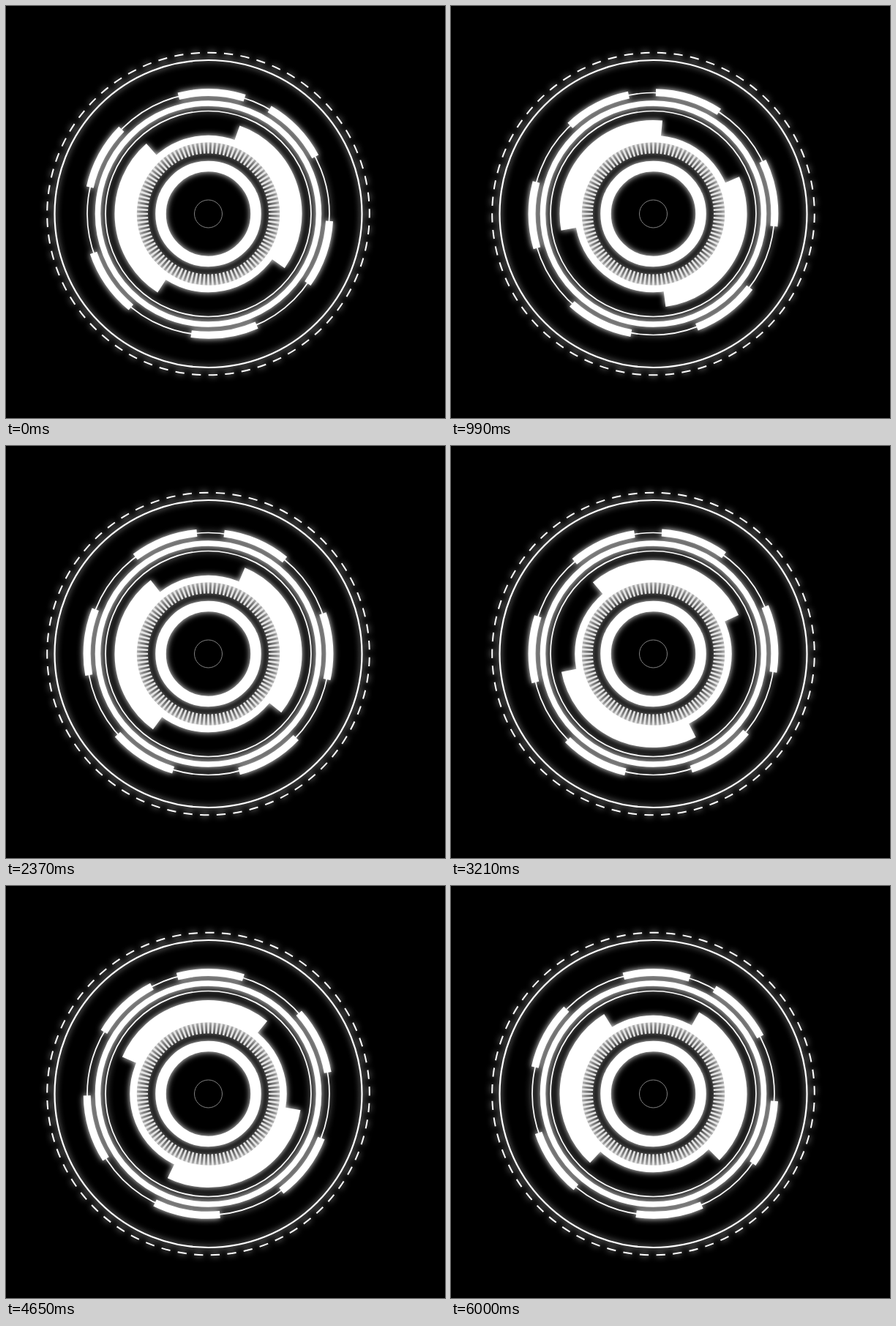
An HTML page for the animation above (6030 ms loop, 600 by 563 pixels).

```html
<!DOCTYPE html>
<html lang="en">
<head>
<meta charset="utf-8">
<title>Rotating dial</title>
<style>
  html, body { margin: 0; height: 100%; overflow: hidden; background: #000; }
  svg { display: block; width: 600px; height: 563px; }
  circle, path { fill: none; stroke: #fff; }
  .glow { filter: drop-shadow(0 0 4px rgba(255, 255, 255, .95)); }
</style>
</head>
<body>
<svg viewBox="0 0 600 563">
  <g transform="translate(276.5 284)">
    <g class="glow">
      <circle r="65" stroke-width="14.5"/>
      <path id="ticks" stroke-width="16" style="stroke:#e4e4e4"/>
      <circle r="102.5" stroke-width="9.5"/>
      <path id="blocks" stroke-width="22"/>
      <circle r="140.5" stroke-width="1.7"/>
      <circle r="151" stroke-width="7.5"/>
      <circle r="165.5" stroke-width="1.7"/>
      <path id="segments" stroke-width="10"/>
      <circle r="210" stroke-width="2.2"/>
      <path id="dashes" stroke-width="2"/>
    </g>
    <circle r="19" stroke-width="1" style="stroke:#808080"/>
  </g>
</svg>
<script>
const LOOP = 6030, STEP = 30;
const times = [0, 990, 2370, 3210, 4080, 4650, 6000];
const angles = {
  blocks: [19.6, 66.6, 23, -40.2, 28.4, 100, 29.3],
  segments: [30.3, 1.2, 7.5, 4, -8.9, -14.8, 30.3],
  dashes: [-.3, 1.4, 2.7, 2.9, 3.4, 4.8, 4.6]
};
const $ = id => document.getElementById(id);

// Angles are in degrees, clockwise from twelve o'clock
function point(r, deg) {
  const a = deg * Math.PI / 180;
  return `${r * Math.sin(a)} ${-r * Math.cos(a)}`;
}

function arcs(id, r, count, pitch, sweep, first = 0) {
  let d = '';
  for (let i = 0; i < count; i++) {
    const a = first + i * pitch;
    d += `M${point(r, a)}A${r} ${r} 0 0 1 ${point(r, a + sweep)}`;
  }
  $(id).setAttribute('d', d);
}

arcs('ticks', 90.5, 100, 3.6, 1.8, -.9);
arcs('blocks', 117, 2, 193.2, 105.8);
arcs('segments', 165.8, 6, 63.1, 31.6);
arcs('dashes', 220.3, 61, 360 / 61, 3.2);

// Smooth curve through the keys, at rest at both ends
function slope(keys, i) {
  if (i === 0 || i === keys.length - 1) return 0;
  return (keys[i + 1] - keys[i - 1]) / (times[i + 1] - times[i - 1]);
}

function angleAt(keys, t) {
  let i = 0;
  while (i < times.length - 2 && t >= times[i + 1]) i++;
  const span = times[i + 1] - times[i];
  const u = (t - times[i]) / span, v = 1 - u;
  return v * v * (1 + 2 * u) * keys[i] + u * u * (3 - 2 * u) * keys[i + 1]
    + span * u * v * (v * slope(keys, i) - u * slope(keys, i + 1));
}

function draw() {
  const t = Math.floor(performance.now() % LOOP / STEP) * STEP;
  for (const id in angles) {
    $(id).setAttribute('transform', `rotate(${angleAt(angles[id], t)})`);
  }
  requestAnimationFrame(draw);
}
draw();
</script>
</body>
</html>
```
